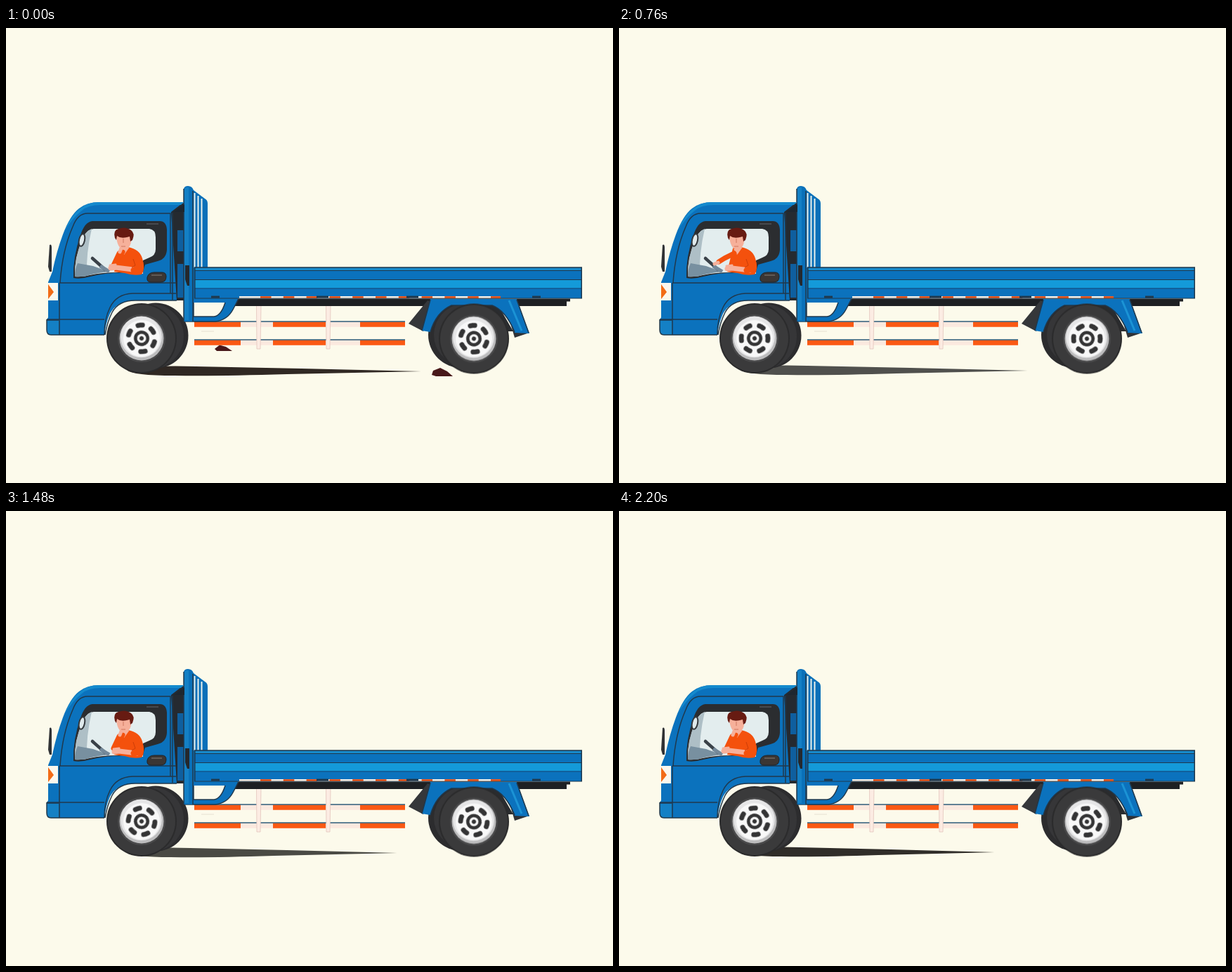
An HTML page without scripts for the animation above (2.24 s loop, 864 px wide and 648 px high).

```html
<!DOCTYPE html>
<html lang="en">
<head>
<meta charset="utf-8">
<title>Blue truck on the road</title>
<style>
html, body { margin: 0; width: 100%; height: 100%; overflow: hidden; background: #fcfaeb; }
svg { display: block; width: 100vw; height: 100vh; }
:root { --loop: 2240ms infinite; }

.line { fill: none; stroke: #20384c; stroke-width: 1.5; }
.skin { fill: none; stroke: #f6b09a; stroke-linecap: round; stroke-linejoin: round; }
.sleeve { fill: none; stroke: #f4510d; stroke-linecap: round; stroke-linejoin: round; }

/* road */
.rock { animation: road var(--loop) steps(56); }
@keyframes road { to { transform: translateX(2240px); } }
.spin { animation: spin var(--loop) steps(56); }
@keyframes spin { from { transform: rotate(24deg); } to { transform: rotate(-1992deg); } }
.shade { transform-origin: 172px 488px; animation: shade var(--loop) linear; }
@keyframes shade {
  0% { transform: translateY(-1px); fill: #302823; }
  17.9% { transform: translateY(-1.500px); fill: #403d36; }
  33.9% { transform: translateY(-2px) scaleX(.978); fill: #50504d; }
  48.2% { transform: translateY(-3px) scaleX(.922); fill: #555553; }
  66% { transform: translateY(-3px) scaleX(.918); fill: #4a4a44; }
  84% { transform: translateY(-3px) scaleX(.922); fill: #3b3935; }
  98.2%, 100% { transform: translateY(-4px) scaleX(.865); fill: #302d29; }
}

/* bump */
.front, .tail, .rails, .axle { animation: tilt var(--loop) ease-in-out; }
.front { --peak: rotate(.86deg); transform-origin: 593px 358px; }
.tail { --peak: translate(-1px, -4px) rotate(-.6deg); transform-origin: 600px 390px; }
.rails { --peak: translateY(-1px) rotate(.55deg); transform-origin: 568px 420px; }
.axle { --peak: scaleY(1.04); transform-origin: 666px 492px; }
@keyframes tilt {
  0%, 8.9%, 25%, 100% { transform: none; }
  17.86% { transform: var(--peak); }
}
.bed { fill: none; d: path("M268 0C452 0 636 0 820 0"); animation: bend var(--loop) ease-in-out; }
@keyframes bend {
  0%, 8.9%, 25%, 100% { d: path("M268 0C452 0 636 0 820 0"); }
  17.86% { d: path("M267 -5C440 6 600 -9 818 -9"); }
}

/* driver */
.arm { d: path("M166 319L153 338L161 321"); animation: arm var(--loop) ease-in-out; }
@keyframes arm {
  0%, 6%, 45%, 100% { d: path("M166 319L153 338L161 321"); }
  17.86%, 24% { d: path("M164 321L148 325L137 329"); }
  33.9% { d: path("M164 321L150 328L142 333"); }
}
.hand { d: path("M162 319L165 311"); animation: hand var(--loop) ease-in-out; }
@keyframes hand {
  0%, 6%, 45%, 100% { d: path("M162 319L165 311"); }
  17.86%, 24% { d: path("M136 329L130 328"); }
  33.9% { d: path("M141 334L136 336"); }
}
.rest { animation: rest var(--loop) ease-in-out; }
@keyframes rest {
  0%, 48%, 84%, 100% { transform: none; }
  17.86% { transform: translateX(2px); }
  33.9%, 66% { transform: translate(5px, 1px); }
}
</style>
</head>
<body>
<svg viewBox="0 0 864 648" preserveAspectRatio="none">
<defs>
  <g id="tyre">
    <circle r="50" fill="#2b2b2c"/>
    <circle r="48" fill="#3a3a3b"/>
    <circle r="34" fill="#4a4a4b"/>
  </g>
  <g id="rim">
    <circle r="31.5" fill="#bcbcbd"/>
    <circle cx="-.5" cy="-2" r="29.3" fill="#e6e6e7"/>
    <circle r="26" fill="#f8f8f8"/>
  </g>
  <g id="holes">
    <circle r="19" fill="none" stroke="#343435" stroke-width="7" stroke-linecap="round" pathLength="60" stroke-dasharray="3.2 6.8" stroke-dashoffset="1.6"/>
    <circle r="11" fill="#343435"/>
    <circle r="6.500" fill="#f5f5f5"/>
    <circle r="3" fill="#343435"/>
  </g>
  <g id="rail">
    <path d="M268 422H568" stroke="#fbe9df" stroke-width="7.500"/>
    <path d="M268 422H334M380 422H455M504 422H568" stroke="#fb5914" stroke-width="7.500"/>
    <path d="M268 418H568" stroke="#2d5a78" stroke-width="1.500"/>
  </g>
</defs>
<rect width="864" height="648" fill="#fcfaeb"/>

<path class="shade" d="M172 488Q200 481 270 483L420 486L591 490L400 494Q300 497 240 496Q180 496 172 488Z"/>
<path class="rock" d="M297 457L304 451.500L313 454L322 460H300Z" fill="#48181a"/>

<g class="rails">
  <use href="#rail"/>
  <use href="#rail" y="26"/>
  <path d="M278 432H296" stroke="#e6dfd2"/>
  <path d="M356.500 394H363L362 457H357ZM455.500 394H462L461 457H456Z" fill="#fcece3" stroke="#e3c4bb" stroke-width=".8"/>
</g>

<!-- chassis -->
<path class="bed" transform="translate(0 391)" stroke="#1e2023" stroke-width="10" pathLength="552" stroke-dasharray="0 55 475 99"/>
<path class="bed" transform="translate(0 387.500)" stroke="#1e2023" stroke-width="4" pathLength="552" stroke-dasharray="0 55 480 99"/>

<!-- rear axle -->
<g class="tail">
  <path d="M600 388L573 421L594 432L612 392Z" fill="#35373a"/>
  <path d="M625 394H700L722 432H612Z" fill="#2a2c2f"/>
</g>
<g class="axle">
  <circle cx="648" cy="437" r="47" fill="#2c2c2e"/>
  <circle cx="653" cy="437" r="44" fill="#363638"/>
</g>
<g class="tail">
  <path d="M719 424L745 434L724 441Z" fill="#303236"/>
  <path d="M604 386L592 431L604 433Q612 405 634 395H692Q711 402 724 434L745 435L727 386Z" fill="#0b72bd"/>
  <path d="M604 387L592 431M727 387L744 434" class="line" stroke-width="1"/>
  <path d="M604 433Q612 405 634 395H692Q711 402 724 433" class="line"/>
  <path d="M716 388L734 431" stroke="#1b93d5" stroke-width="3"/>
</g>
<g class="axle">
  <g transform="translate(666 442.500)">
    <use href="#tyre"/>
    <use href="#rim"/>
    <g class="spin"><use href="#holes"/></g>
  </g>
</g>

<g class="front">
  <!-- front axle -->
  <circle cx="213" cy="438" r="46.500" fill="#2c2c2e"/>
  <circle cx="207" cy="439" r="46" fill="#363638"/>
  <g transform="translate(193 442)">
    <use href="#tyre"/>
    <use href="#rim"/>
    <g class="spin"><use href="#holes"/></g>
  </g>

  <!-- cab back and step -->
  <path d="M235 252L254 249V388H235Z" fill="#252a30"/>
  <path d="M244 288H254V318H244ZM244 336H254V384H244Z" fill="#0f5f9f"/>
  <path d="M254 384H331L323 401Q315 416 298 418H254ZM267 391V411H296Q306 410 312 391Z" fill="#0b72bd" fill-rule="evenodd"/>
  <path d="M331 386L323 401Q315 416 298 418H254M267 391V411H296Q306 410 312 391" class="line" stroke-width="1"/>

  <!-- headboard -->
  <path d="M253 229Q254 225 259 225Q265 225 267 231L283 243Q287 245 287 250V341H269V388H266V418H253Z" fill="#0a70b9"/>
  <path d="M268.500 235V341M273.500 239V341M278.500 243V341" stroke="#e9f0ec" stroke-width="2"/>
  <path d="M254 230Q256 226 260 227V416H254Z" fill="#1480c5"/>
  <path d="M253 229V418M266 232V418" class="line" stroke-width="1"/>
  <path d="M255 338H261V367H258L255 358Z" fill="#25282d"/>

  <!-- cab body -->
  <path d="M60 362L66 347Q72 318 81 294Q91 267 104 257Q115 248 133 248H253L235 262L243 388H184Q158 388 148 407Q142 420 140 437H64Q58 437 58 430V416L60 412Z" fill="#0b72bd"/>
  <path d="M84 288Q93 266 106 257Q116 248 133 248H253L249 252H135Q117 252 108 260Q95 270 84 288Z" fill="#148acd"/>
  <path d="M239 262L254 251V262Z" fill="#1e2730"/>
  <path d="M77 363Q80 317 95 283Q102 264 116 264H234V378M237 263V387M76 363H242M76 363V437M58 415H140M140 437Q140 414 148 398Q157 379 180 378H242M141 437Q144 419 151 405Q160 388 184 388H243" class="line"/>
  <path d="M58 417H75V437H64Q58 437 58 430Z" fill="#1480c5"/>
  <path d="M58 415V430Q58 437 64 437H140M58 416H75" class="line"/>
  <path d="M60 363H74V388H60Z" fill="#fbf7ed"/>
  <path d="M60 365L68 376L60 386Z" fill="#f26b16"/>
  <path d="M62 309Q65 307 65 313V347H62L60 340Z" fill="#303235"/>

  <!-- window -->
  <path d="M96 356Q95 326 106 295Q112 276 123 275H219Q228 275 229 287V316Q228 329 216 332L198 337L194 350Q150 346 120 354Q106 358 96 356Z" fill="#2b2d30"/>
  <path d="M98 354Q97 327 110 298Q116 286 125 286H204Q213 287 213 298V315Q213 324 204 327L195 331V350Q150 345 119 352Q107 355 98 354Z" fill="#e3edee"/>
  <path d="M98 354Q97 327 108 303Q112 290 122 286Q114 320 115 352Z" fill="#aebfc6"/>
  <path d="M98 354Q98 343 102 335L124 339L146 347Q122 350 112 354Z" fill="#7890a0"/>
  <path d="M200 279H217" stroke="#50545a" stroke-width="1.500"/>
  <ellipse cx="108" cy="302" rx="4" ry="9" fill="#dfe9eb" stroke="#34383c" stroke-width="2" transform="rotate(12 108 302)"/>

  <!-- driver -->
  <path d="M123 328L141 344" stroke="#3a4148" stroke-width="4.500" stroke-linecap="round"/>
  <path d="M134 339L147 347" stroke="#74899a" stroke-width="5"/>
  <path d="M162 305H174V322H162Z" fill="#eaa38e"/>
  <path d="M162 314L174 312Q190 315 194 328Q199 343 193 351Q180 353 169 349L154 347Z" fill="#f4510d"/>
  <path d="M163 315L168 323L176 312Z" fill="#f6b09a"/>
  <path class="arm sleeve" stroke-width="7"/>
  <path class="hand skin" stroke-width="5"/>
  <path d="M157 296H178Q180 313 168 316Q158 314 157 296Z" fill="#f6b09a"/>
  <path d="M155 299Q152 288 160 286Q170 282 178 288Q184 292 180 302L177 304L176 297Q164 301 158 296L157 302Z" fill="#671b12"/>
  <path d="M167 300V306M164 311H170" stroke="#cf765e" stroke-width="1" fill="none"/>
  <g class="rest">
    <path class="skin" d="M149 342L156 341L181 344" stroke-width="7"/>
    <path class="skin" d="M148 338L156 337" stroke-width="3"/>
  </g>
  <path class="sleeve" d="M188 327L190 343L182 345" stroke-width="9"/>
  <path d="M181 329L184 338L179 341" fill="none" stroke="#cc3d08" stroke-width="1"/>

  <path d="M201 355Q203 348 211 348H222Q228 348 228 354Q228 362 220 362H206Q200 362 201 355Z" fill="#3b3634" stroke="#202326"/>
  <path d="M207 352H222" stroke="#615a55" stroke-width="2"/>
</g>

<!-- bed side -->
<g stroke="#0b72bd">
  <path class="bed" transform="translate(0 363)" stroke-width="44"/>
  <path class="bed" transform="translate(0 364.500)" stroke="#149ad9" stroke-width="11"/>
  <path class="bed" transform="translate(0 343.500)" stroke="#178acb" stroke-width="3"/>
  <path class="bed" transform="translate(0 383.500)" stroke="#fbf3e9" stroke-width="3" pathLength="552" stroke-dasharray="0 64 372 200"/>
  <path class="bed" transform="translate(0 383.500)" stroke="#f4591b" stroke-width="3" pathLength="552" stroke-dasharray="0 94 15.500 17.300 15.500 17.300 15.500 17.300 15.500 17.300 15.500 17.300 15.500 17.300 15.500 17.300 15.500 17.300 15.500 17.300 15.500 17.300 14 200"/>
  <g stroke="#20384c" stroke-width="1.500">
    <path class="bed" transform="translate(0 341)"/>
    <path class="bed" transform="translate(0 345.500)" stroke-width="1"/>
    <path class="bed" transform="translate(0 358.500)" stroke-width="1"/>
    <path class="bed" transform="translate(0 371)" stroke-width=".6"/>
    <path class="bed" transform="translate(0 385)" stroke-width="1"/>
    <path class="bed" transform="translate(0 383)" stroke-width="3" pathLength="552" stroke-dasharray="0 24 12 138 17 111 17 162 12 99"/>
    <path class="bed" transform="translate(0 363)" stroke-width="44" pathLength="552" stroke-dasharray="1.500 549 1.500 9"/>
  </g>
</g>

<path class="rock" d="M606 494L608 488L618 484L628 489L636 496H612Z" fill="#48181a"/>
</svg>
</body>
</html>
```
